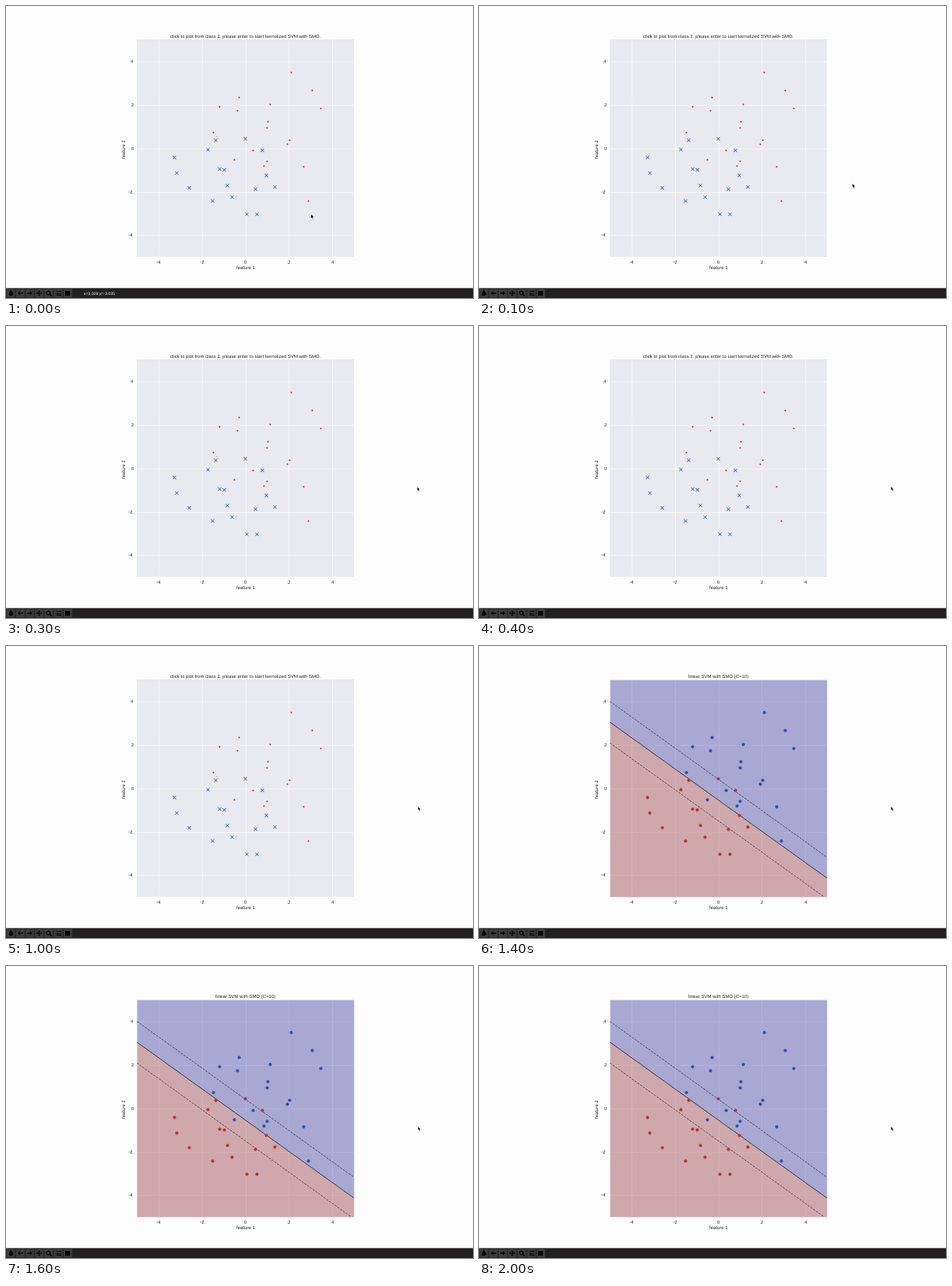
A matplotlib script that plays this animation: 600x375 px, repeating every 3000 ms.

```python
import matplotlib as mpl
import matplotlib.pyplot as plt
import numpy as np
from matplotlib.animation import FuncAnimation
from matplotlib.patches import FancyArrow, Rectangle

mpl.rcParams["font.family"] = "Liberation Sans"
mpl.rcParams["text.hinting"] = "none"

W, H = 600, 375
FRAMES, STEP = 30, 100          # 3000 ms loop
FIT_AT = 14                     # the classifier result appears
PX = 0.72                       # points per pixel at 100 dpi
CX, CY, UNIT = 307.5, 182.8, 27.87
INK = "#262626"
BLUE, RED, PLUM = "#3350b0", "#bf3134", "#a0375a"


def arc(n, a, mid, b):
    """n evenly timed clicks along the parabola through three points."""
    u = np.linspace(0, 1, n)[:, None]
    a, mid, b = map(np.array, (a, mid, b))
    return (1 - u) * (1 - 2 * u) * a + 4 * u * (1 - u) * mid + u * (2 * u - 1) * b


def boundary(x, shift=0.0):
    return -0.54 - 0.718 * x + shift


crosses = np.vstack([
    arc(5, (-3.27, -.40), (-2.59, -1.80), (.04, -3.01)),
    arc(4, (-1.74, -.04), (-1.01, -1.34), (-.63, -2.24)),
    arc(5, (-1.37, .37), (.76, -.08), (.53, -3.02)),
    arc(3, (-.99, -.98), (.45, -1.88), (1.345, -1.78))])
dots = np.vstack([
    arc(3, (2.11, 3.52), (3.08, 2.67), (3.46, 1.87)),
    arc(5, (-.39, 1.74), (2.04, .40), (2.88, -2.42)),
    arc(4, (-1.50, .75), (-.82, 2.25), (1.13, 2.04)),
    arc(3, (.98, .97), (1.93, .205), (.98, -.585)),
    arc(3, (.86, -.78), (.35, -.065), (-.51, -.50))])

fig = plt.figure(figsize=(W / 100, H / 100), dpi=100, facecolor="#fdfdfd")
half = 5 * UNIT
ax = fig.add_axes([(CX - half) / W, 1 - (CY + half) / H, 2 * half / W, 2 * half / H])
ax.set(xlim=(-5, 5), ylim=(-5, 5), xticks=[], yticks=[], facecolor="#e9e9f0")
ax.spines[:].set_visible(False)

ui = fig.add_axes([0, 0, 1, 1])
ui.set(xlim=(0, W), ylim=(H, 0))
ui.axis("off")


def text(x, y, s, size=6, color=INK, **kw):
    return ui.text(x, y, s, fontsize=size * PX, color=color, **kw)


def scatter(pts, marker, size, color, edge=0):
    return ax.plot(*pts.T, marker, color=color, ms=size * PX, mew=edge * PX, snap=False)


def rule(x, y, width, **kw):
    return ax.plot(x, y, color="black", lw=width * PX, **kw)


# Plot frame
for v in range(-4, 5, 2):
    ax.axvline(v, color="white", lw=0.5 * PX, zorder=0.5)
    ax.axhline(v, color="white", lw=0.5 * PX, zorder=0.5)
    label = str(v).replace("-", "\u2212")
    text(CX + v * UNIT, 331, label, 5.8, ha="center")
    text(163.5, CY - v * UNIT + 2.1, label, 5.8, ha="right")
text(CX, 338, "feature 1", ha="center")
text(152, CY, "feature 2", ha="center", va="center", rotation=90)
title = text(CX, 40.4, "", ha="center")

# Samples before the fit
samples = scatter(crosses, "x", 3.7, "#3a5fb8", 0.8) + scatter(dots, "o", 2.1, "#d0323c")

# Decision regions, margins and predicted classes
x = np.array([-5.0, 5.0])
line = boundary(x)
misfit = crosses[:, 1] > boundary(crosses[:, 0])
fit = [ax.fill_between(x, line, edge, color=color, alpha=0.28, lw=0, zorder=1)
       for edge, color in ((5, "#000088"), (-5, "#880000"))]
fit += rule(x, line, 0.55)
for shift in (-0.96, 0.96):
    fit += rule(x, boundary(x, shift), 0.55, alpha=0.75, dashes=(5.5, 2.4))
for pts, color in ((dots, BLUE), (crosses[~misfit], RED), (crosses[misfit], PLUM)):
    fit += scatter(pts, "o", 4.1, color)

# Toolbar
BAR, TILE, ICON = "#231f20", "#3d3b3c", "#050505"


def box(x, y, w, h, color):
    ui.add_patch(Rectangle((x, y), w, h, color=color, lw=0, snap=False))


def mark(x, y, marker, size, color=ICON, **kw):
    ui.plot(x, y, marker, color=color, ms=size * PX, mew=0, snap=False, **kw)


def stroke(x, y, width):
    ui.plot(x, y, color=ICON, lw=width * PX, solid_capstyle="butt")


def arrow(x, y, dx, dy, width=1.4, head=5.5):
    ui.add_patch(FancyArrow(x, y, dx, dy, width=width, head_width=head,
                            head_length=head * 0.6, length_includes_head=True,
                            color=ICON, lw=0))


def home(x, y):
    mark(x, y - 1.5, "^", 7)
    mark(x, y + 1.4, "s", 4.6)
    box(x - 0.7, y + 1.3, 1.4, 2.5, TILE)


def back(x, y):
    arrow(x + 3.5, y, -7, 0)


def forward(x, y):
    arrow(x - 3.5, y, 7, 0)


def move(x, y):
    for dx, dy in ((4, 0), (-4, 0), (0, 4), (0, -4)):
        arrow(x, y, dx, dy, 1.1, 3.2)


def zoom(x, y):
    mark(x - 0.7, y - 0.7, "o", 5.8)
    mark(x - 0.7, y - 0.7, "o", 3.4, TILE)
    stroke([x + 0.9, x + 3.6], [y + 0.9, y + 3.6], 1.5)


def sliders(x, y):
    for row in (-1, 0, 1):
        stroke([x - 3.7, x + 3.7], [y + 2.5 * row] * 2, 0.8)
        mark(x + 1.5 * (-1) ** row * -1, y + 2.5 * row, "s", 1.8)


def save(x, y):
    mark(x, y, "s", 6.8)
    box(x - 2, y - 2.7, 3.2, 1.9, TILE)
    box(x - 2.2, y + 0.7, 4.4, 2, TILE)


box(0, 362.3, W, 13, BAR)
for i, icon in enumerate((home, back, forward, move, zoom, sliders, save)):
    cx, cy = 6.2 + 12.2 * i, 368.8
    box(cx - 5.6, cy - 5.5, 11.2, 11, TILE)
    icon(cx, cy)
status = text(100, 370.6, "", 5.15, "white")

# Pointer
START = np.array([3.029, -3.035])
END = np.array([7.955, -0.83])
TAIL = np.array([2.5, 6.0])
pointer = ui.add_patch(FancyArrow(0, 0, *-TAIL, width=1.1, head_width=3.9,
                                  head_length=4.6, length_includes_head=True,
                                  fc="black", ec="white", lw=0.4 * PX))


def update(i):
    ease = 1 - (1 - min(i / 4, 1)) ** 3.55
    pos = START + (END - START) * ease
    tip = np.array([CX, CY]) + UNIT * pos * (1, -1)
    pointer.set_data(x=tip[0] + TAIL[0], y=tip[1] + TAIL[1])
    inside = np.all(np.abs(pos) < 5)
    status.set_text(f"x={pos[0]:.3f} y={pos[1]:.3f}" if inside else "")

    fitted = i >= FIT_AT
    title.set_text("linear SVM with SMO (C=10)" if fitted else
                   "click to plot from class 2. please enter to start "
                   "kernelized SVM with SMO.")
    for a in samples:
        a.set_visible(not fitted)
    for a in fit:
        a.set_visible(fitted)
    return []


anim = FuncAnimation(fig, update, frames=FRAMES, interval=STEP,
                     repeat=True, repeat_delay=0, blit=False)
plt.show()
```
